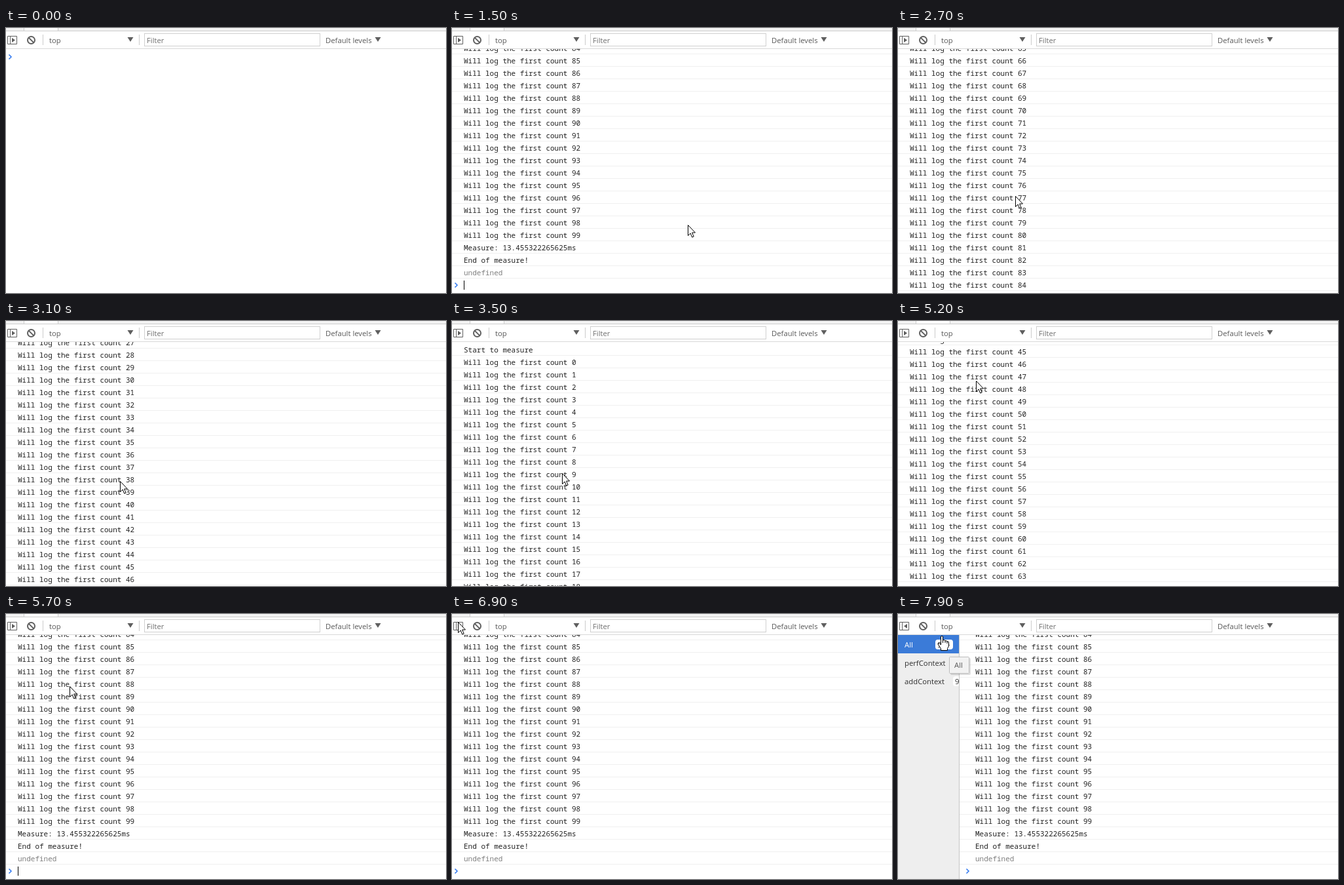
An HTML page that plays this animation: 672x404 px, repeating every 8 s.

```html
<!DOCTYPE html>
<html lang="en">
<head>
<meta charset="utf-8">
<title>Console log</title>
<style>
  html, body { margin: 0; width: 100%; height: 100%; overflow: hidden; background: #fff; }
  svg { display: block; }
  text { font: 11.3px "Open Sans", sans-serif; fill: #5a5a5a; white-space: pre; }
  #log text { font: 11px "Noto Sans Mono", monospace; fill: #222; }
  #log text.result { fill: #808080; }
  #sidebar text { fill: #303030; }
  #sidebar text.selected { fill: #fff; }
</style>
</head>
<body>
<svg width="672" height="404" viewBox="0 0 672 404">
  <g id="console">
    <g id="log"></g>
    <g id="prompt">
      <path d="M4.5 40.5 8 44 4.5 47.5" fill="none" stroke="#367cf1" stroke-width="1.6"/>
      <rect id="caret" x="18" y="37" width="1" height="14"/>
    </g>
  </g>

  <g id="sidebar">
    <rect y="32" width="93" height="372" fill="#eee"/>
    <rect y="32" width="93" height="28" fill="#3b7bd8"/>
    <g fill="#fff">
      <rect x="57" y="39" width="27" height="15" rx="4"/>
      <path d="M93 67H88a4 4 0 0 0-4 4v7a4 4 0 0 0 4 4h5zM93 95H88a4 4 0 0 0-4 4v7a4 4 0 0 0 4 4h5z"/>
    </g>
    <text class="selected" x="10" y="51">All</text>
    <text x="60" y="51">99+</text>
    <text x="10" y="79">perfContext</text>
    <text x="87" y="79">9</text>
    <text x="10" y="107">addContext</text>
    <text x="87" y="107">9</text>
    <rect x="93" y="32" width="1" height="372" fill="#c4c4c4"/>
  </g>

  <g id="toolbar">
    <rect width="672" height="32" fill="#fff"/>
    <path d="M0 0H27V4H0zM80 0H672V4H80z" fill="#f3f3f3"/>
    <path d="M0 4.5H672M27.5 0V4M79.5 0V4M56.5 10V26M203.5 10V26" stroke="#ccc"/>
    <path d="M0 31.5H672" stroke="#d9d9d9"/>
    <path d="M2.5 12.5H16.5V24.5H2.5zM6.5 12V25" fill="none" stroke="#5f5f5f"/>
    <path id="arrow" fill="#5f5f5f"/>
    <g fill="none" stroke="#5f5f5f" stroke-width="2">
      <circle cx="38.5" cy="18.5" r="5.5"/>
      <path d="M34.6 14.6 42.4 22.4"/>
    </g>
    <rect x="211.5" y="8.5" width="268" height="19" fill="#fff" stroke="#d0d0d0"/>
    <path d="M185.5 14H194.5L190 21zM563.5 14H572.5L568 21z" fill="#5f5f5f"/>
    <text x="66" y="23">top</text>
    <text x="215" y="23" style="fill:#707070">Filter</text>
    <text x="488" y="23">Default levels</text>
  </g>

  <g id="tooltip">
    <rect x="80" y="67" width="31" height="26" rx="2" opacity=".13"/>
    <rect x="78.5" y="65.5" width="30" height="25" rx="1" fill="#f2f2f2" stroke="#bdbdbd"/>
    <text x="86" y="82">All</text>
  </g>

  <g id="pointer" fill="#fff" stroke="#000">
    <path id="arrowPointer" d="M.5.5V16.5L4.2 13 6.7 19 9.2 18 6.7 12H11.5z"/>
    <g id="handPointer">
      <path d="M-1.5 14V2Q-1.5.5 0 .5T1.5 2V7Q4.5 5.5 5 8 7.5 7 8 9 10.5 8 10.5 11V16L8.5 19.5V22.5H-1.5V20L-5.5 13.5Q-6 11-4 11.5z"/>
      <path d="M1.5 7V11M5 8V11M8 9V12" fill="none"/>
    </g>
  </g>
</svg>
<script>
const $ = id => document.getElementById(id);
const LOOP = 8000, STEP = 100, ROW = 19;
const RUN_AT = 1500, OPEN_AT = 7100, TOOLTIP_AT = 7800;

const lines = [
  "Start to measure",
  ...Array.from({ length: 100 }, (_, i) => `Will log the first count ${i}`),
  "Measure: 13.455322265625ms",
  "End of measure!",
  "undefined"
];
$("log").innerHTML = lines.map((line, i) => {
  const y = 44 + i * ROW;
  const kind = line === "undefined" ? "result" : "message";
  return `<text class="${kind}" x="18" y="${y + 4}">${line}</text>
    <rect x="-10" y="${y + 8}" width="700" height="1" fill="#f0f0f0"/>`;
}).join("");

// Keyframes: time, then values
const scrollKeys = [
  [2300, 1628], [2700, 1267], [3400, 0], [4500, 0], [5200, 871], [5600, 1628]
];
const pointerKeys = [
  [1500, 360, 300], [2200, 184, 262], [2300, 184, 262], [2700, 179, 256],
  [3500, 168, 232], [4100, 63, 25], [4200, 63, 25], [4400, 70, 34], [4500, 70, 34],
  [5200, 119, 91], [5700, 97, 110], [6300, 72, 84], [6900, 9, 12], [7200, 11, 15],
  [7500, 114, 77], [7800, 68, 36], [7900, 67, 33]
];

function sample(keys, t) {
  const next = keys.findIndex(key => key[0] > t);
  if (next === 0) return keys[0].slice(1);
  if (next < 0) return keys.at(-1).slice(1);
  const a = keys[next - 1], b = keys[next];
  const k = (t - a[0]) / (b[0] - a[0]);
  return a.slice(1).map((v, i) => Math.round(v + (b[i + 1] - v) * k));
}

const show = (id, on) => $(id).setAttribute("display", on ? "inline" : "none");
const move = (id, x, y) => $(id).setAttribute("transform", `translate(${x} ${y})`);

function draw(t) {
  const ran = t >= RUN_AT, open = t >= OPEN_AT;
  const [scroll] = sample(scrollKeys, t);
  const [x, y] = sample(pointerKeys, t);
  const hand = open && y >= 32 && x < 93;

  show("log", ran);
  show("caret", ran && !open && (t + 600) % 1000 < 500);
  move("prompt", 0, ran ? lines.length * ROW : 0);
  move("console", open ? 100 : 0, ran ? -scroll : 0);

  show("sidebar", open);
  $("arrow").setAttribute("d", open ? "M14 15V22L9 18.5z" : "M9 15V22L14 18.5z");
  show("tooltip", t >= TOOLTIP_AT);

  show("pointer", ran);
  move("pointer", x, y);
  show("arrowPointer", !hand);
  show("handPointer", hand);
}

const start = performance.now();
function frame() {
  const t = (performance.now() - start) % LOOP;
  draw(Math.floor(t / STEP) * STEP);
  requestAnimationFrame(frame);
}
frame();
</script>
</body>
</html>
```
